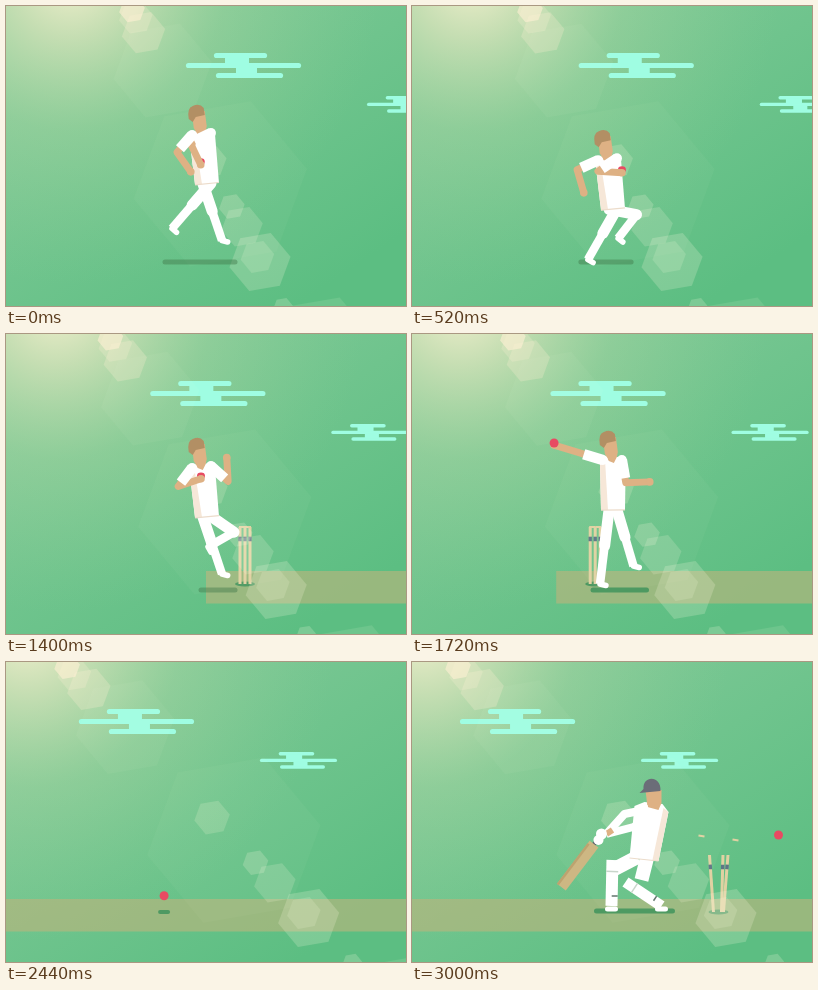
Animation, 400 px wide and 300 px high, one loop 3.04 s. Source, as an HTML page with a canvas:

```html
<!DOCTYPE html>
<html lang="en">
<head>
<meta charset="utf-8">
<title>Cricket</title>
<style>
html, body { margin: 0; width: 100%; height: 100%; overflow: hidden; background: #6cc48c; }
canvas { display: block; width: 400px; height: 300px; }
</style>
</head>
<body>
<canvas id="stage" width="400" height="300"></canvas>
<script>
const c = document.getElementById('stage').getContext('2d');
const LOOP = 3040, STEP = 40, STRIDE = 640;
const GATHER = 1400, LAND = 1640, RELEASE = 2040, BOUNCE = 2480, HIT = 2760, END = 3000;
const SKIN = '#deb184', WHITE = '#fff', SHADE = '#f6e7d8', RED = '#e84a62', WOOD = '#e0d1a2';
const SHADOW = 'rgba(45,140,85,.7)', SOFT = 'rgba(65,120,75,.45)';

const { sin, cos, min, max, hypot, PI } = Math;
const lerp = (a, b, p) => a + (b - a) * p;
const mix = (a, b, p) => a.map((v, i) => lerp(v, b[i], p));
const add = (a, b) => [a[0] + b[0], a[1] + b[1]];
const polar = (angle, r) => [r * cos(angle), r * sin(angle)];
const part = (t, a, b) => min(1, max(0, (t - a) / (b - a)));
const ease = p => p * p * (3 - 2 * p);

function line(points, width, color, cap = 'butt') {
  c.beginPath();
  points.forEach(p => c.lineTo(...p));
  c.lineWidth = width;
  c.lineCap = cap;
  c.lineJoin = 'round';
  c.strokeStyle = color;
  c.stroke();
}
function poly(points, color) {
  c.beginPath();
  points.forEach(p => c.lineTo(...p));
  c.closePath();
  c.fillStyle = color;
  c.fill();
}
function dot(x, y, r, color, ry = r) {
  c.beginPath();
  c.ellipse(x, y, r, ry, 0, 0, 7);
  c.fillStyle = color;
  c.fill();
}

// Camera travel: time, distance, speed
const track = [[0, 0, .245], [GATHER, 343, .245], [RELEASE, 425, .06], [2440, 1030, .85], [LOOP, 1274, .1]];
function camera(t) {
  const i = max(1, track.findIndex(k => k[0] >= t));
  const [t0, x0, v0] = track[i - 1], [t1, x1, v1] = track[i];
  const d = t1 - t0, p = (t - t0) / d, q = 1 - p;
  return lerp(x0, x1, ease(p)) + d * p * q * (v0 * q - v1 * p);
}

function backdrop(u) {
  let g = c.createLinearGradient(90, 0, 290, 300);
  g.addColorStop(0, '#84c999');
  g.addColorStop(.5, '#6fc48d');
  g.addColorStop(1, '#5cbe82');
  c.fillStyle = g;
  c.fillRect(0, 0, 400, 300);
  const x = lerp(65, 10, u);
  g = c.createRadialGradient(x, -30, 0, x, -30, 310);
  g.addColorStop(0, 'rgba(250,242,210,.95)');
  g.addColorStop(.2, 'rgba(232,233,192,.65)');
  g.addColorStop(.5, 'rgba(185,220,165,.3)');
  g.addColorStop(1, 'rgba(150,210,150,0)');
  c.fillStyle = g;
  c.fillRect(0, 0, 400, 300);
}

function cloud(x, y, s) {
  c.save();
  c.translate(x, y);
  c.scale(s, s);
  const color = '#9ffde2';
  [[28, 81], [0, 115], [30, 97]].forEach(([a, b], i) =>
    line([[a + 2.5, 2.5 + 10 * i], [b - 2.5, 2.5 + 10 * i]], 5.2, color, 'round'));
  c.fillStyle = color;
  c.fillRect(39, 3, 24, 9);
  c.fillRect(50, 13, 21, 9);
  c.restore();
}

// Flares sit on the ray from the light to a pivot: place on the ray, radius, opacity
function flare(u) {
  const light = [126 - 80 * u, 4 + u], pivot = [254 + 60 * u, 256];
  [[0, 13, .6], [.03, 17, .22], [.09, 22, .25], [.24, 50, .04], [.6, 18, .17], [.69, 88, .03],
   [.78, 13, .2], [.86, 21, .17], [.98, 17, .15], [1, 31, .2], [1.18, 10, .2], [1.42, 75, .1]
  ].forEach(([k, r, a]) => {
    const center = mix(light, pivot, k);
    poly([0, 1, 2, 3, 4, 5].map(i => add(center, polar(i * PI / 3 - .17, r))),
      `rgba(255,${k < .1 ? '240,212' : '250,225'},${a})`);
  });
}

function wicket(x, p = 0) {
  dot(x, 250, 10, SHADOW, 2.4);
  [-1, 0, 1].forEach(i => {
    const foot = [x + 5 * i + (i ? 0 : 3 * p), 250], top = [x + 5 * i + (i < 0 ? -4 : 4.5) * p, 193];
    line([foot, top], 3, WOOD);
    line([mix(top, foot, .17), mix(top, foot, .25)], 3.4, '#5d7685');
  });
  const fly = Math.sqrt(p);
  [-1, 1].forEach(i => {
    const bx = x + i * lerp(3, 17, fly), by = lerp(193, 176 + 2 * i, fly);
    line([[bx - 3, by - .6 * p], [bx + 3, by + .6 * p]], 2, WOOD);
  });
}

// Middle joint of a limb from a to b; bend 1 points backwards, -1 forwards
function joint(a, b, upper, lower, bend) {
  const dx = b[0] - a[0], dy = b[1] - a[1], d = max(1, hypot(dx, dy));
  const reach = d > upper + lower ? d * upper / (upper + lower) : (upper ** 2 - lower ** 2 + d * d) / (2 * d);
  const h = bend * Math.sqrt(max(0, upper ** 2 - reach ** 2));
  return [a[0] + (dx * reach - dy * h) / d, a[1] + (dy * reach + dx * h) / d];
}
function arm(shoulder, hand) {
  const elbow = joint(shoulder, hand, 23, 24, 1);
  line([shoulder, elbow, hand], 7, SKIN);
  dot(...hand, 3.8, SKIN);
  line([shoulder, mix(shoulder, elbow, .8)], 10.5, WHITE);
  dot(...shoulder, 5, WHITE);
}
function leg(hip, foot) {
  const knee = joint(hip, foot, 28, 30, -1);
  const dx = foot[0] - knee[0], dy = foot[1] - knee[1], d = hypot(dx, dy);
  line([hip, knee], 11, WHITE, 'round');
  line([knee, foot], 8.5, WHITE);
  line([foot, add(foot, [6 * dy / d, max(1.5, -6 * dx / d)])], 5.5, WHITE, 'round');
}
function head(at, turn) {
  c.save();
  c.translate(...at);
  c.rotate(turn);
  poly([[-5, -2], [8, -2], [10, 13], [9, 18], [6, 24], [1, 22], [-3, 15]], SKIN);
  c.beginPath();
  c.moveTo(-8, 6);
  c.quadraticCurveTo(-10, -5, -4, -7);
  c.quadraticCurveTo(3, -10, 7, -5);
  c.lineTo(8, 2);
  c.lineTo(-1, 4);
  c.lineTo(-4, 9);
  c.closePath();
  c.fillStyle = '#b28f64';
  c.fill();
  c.restore();
}

// Running: each foot follows a tilted loop while the body bounces once per step
const bounce = t => 1 - (2 * ((t / STRIDE * 2 + .375) % 1) - 1) ** 2;
function runFoot(t, offset) {
  const a = 2 * PI * (t / STRIDE + offset);
  return [191 + 25 * cos(a) - 6 * sin(a), 243 + 6 * cos(a) + 14 * sin(a) - 15.5 * bounce(t)];
}

function bowler(t, cam) {
  const off = t > RELEASE ? cam - 425 : 0;
  if (off > 320) return;
  const gather = ease(part(t, 1220, GATHER)), bowl = ease(part(t, GATHER, RELEASE));
  const lean = lerp(-.1, .83, ease(part(t, LAND, RELEASE)));
  const hip = [201, 203 - 27 * bounce(min(t, LAND))];
  const chest = add(hip, polar(lean - PI / 2, 53));
  const side = (p, w) => add(p, polar(lean + PI, w));

  const lift = 8 * sin(PI * bowl);
  const feet = [
    mix(runFoot(t, 0), add(mix([216, 240], [160, 244], bowl), [0, lift]), gather),
    mix(runFoot(t, .5), mix([202, 213], [241, 251], bowl), gather)
  ];
  // The bowling arm turns a full circle; the other one drops
  const swing = cos(2 * PI * (t / STRIDE - .12));
  const turn = lerp(.88, 6, bowl) + 1.4 * part(t, RELEASE, 2240);
  const backHand = mix([-10 + 12 * swing, 34 + 4 * swing], polar(turn, lerp(14, 51, part(t, GATHER, LAND))), gather);
  const frontHand = mix([-14 * swing, 20 + 16 * swing], polar(lerp(-.5, 1.83, bowl), lerp(18, 53, bowl)), gather);
  const shoulders = [side(chest, 10), side(chest, -9)].map(p => add(p, polar(lean + PI / 2, 3)));
  const hands = [add(shoulders[0], backHand), add(shoulders[1], frontHand)];
  const [bx, by] = hands[t < 1240 ? 1 : 0];

  c.save();
  c.translate(-off, 0);
  const xs = feet.map(f => f[0]);
  line([[min(...xs) - 7, 256], [max(...xs) + 13, 256]], 5, t < LAND ? SOFT : SHADOW, 'round');
  leg(side(hip, -4), feet[1]);
  leg(side(hip, 4), feet[0]);
  poly([side(chest, 13), side(chest, -13), side(hip, -12), side(hip, 12)], WHITE);
  poly([side(chest, 13), side(chest, 8), side(hip, 5), side(hip, 12)], SHADE);
  line([side(hip, 12), side(hip, -12)], 1.2, '#ecdccb');
  const nod = max(0, lean) * 1.9;
  head(add(chest, polar(nod - 1.84, 18.7)), nod);
  if (t < LAND) dot(bx, by - 3, 4, RED, 3.4);
  arm(shoulders[1], hands[1]);
  arm(shoulders[0], hands[0]);
  if (t >= LAND && t < RELEASE) dot(bx, by - 2, 4.5, RED);
  c.restore();
}

function pad(knee, ankle, width) {
  line([knee, ankle], width, WHITE);
  const dx = (ankle[0] - knee[0]) / width, dy = (ankle[1] - knee[1]) / width;
  const size = hypot(dx, dy), nx = -dy / size * width / 2, ny = dx / size * width / 2;
  [[.25, 1, '#c9d6cb'], [.78, 0, '#62756d']].forEach(([p, full, color]) => {
    const m = mix(knee, ankle, p);
    line([[m[0] + nx * full, m[1] + ny * full], [m[0] - nx, m[1] - ny]], 1.5, color);
  });
  line([add(ankle, [-4, 3]), add(ankle, [4, 3])], 5, WHITE, 'round');
}

function batter(t, x) {
  if (x > 260) return;
  const s = ease(part(t, 2560, 2880)), q = 1 - s;
  c.save();
  c.translate(x, 0);
  line([[184, 249], [260, 249]], 5, SHADOW, 'round');
  line([[235, 194], [229, 218]], 14, WHITE);
  pad([213, 220], [249, 244], 11);
  line([[225, 195], [202 + 12 * q, 207]], 14, WHITE);
  pad([200 + 12 * q, 198], [199 + 12 * q, 244], 12);

  c.translate(4 * q, 0);
  poly([[222, 144], [232, 140], [250, 142], [256, 150], [246, 199], [217, 196]], WHITE);
  poly([[251, 146], [256, 150], [246, 199], [240, 198]], SHADE);
  line([[217, 196], [246, 199]], 1.2, '#ecdccb');
  poly([[233, 128], [249, 128], [249, 141], [246, 148], [235, 145]], SKIN);
  c.beginPath();
  c.moveTo(227, 131);
  c.lineTo(231, 127);
  c.bezierCurveTo(230, 113, 249, 113, 248, 129);
  c.closePath();
  c.fillStyle = '#6b6d78';
  c.fill();

  // bat, arms and gloves follow the hands
  const hands = [187 + 18 * q, 175 + 6 * q];
  c.save();
  c.translate(...hands);
  c.rotate(lerp(.35, 2.22, s));
  line([[-8, 0], [10, 0]], 4, '#5f646c');
  line([[9, 0], [63, 0]], 11, '#cdb783');
  line([[12, 4.5], [63, 4.5]], 2.5, '#bda36f');
  c.restore();
  const wrist = add(hands, [7, -3]);
  line([[236, 147], [212 + 5 * q, 152], wrist], 8, WHITE);
  line([[242, 154], [221 + 3 * q, 165], wrist], 8, WHITE);
  line([add(wrist, [6, -4]), wrist], 6, SKIN);
  dot(hands[0] + 2, hands[1] - 3, 5.5, WHITE);
  dot(hands[0] - 1, hands[1] + 3, 5, WHITE);
  c.restore();
}

function ball(t, cam) {
  if (t < RELEASE) return;
  const drop = part(t, RELEASE, BOUNCE), rise = part(t, BOUNCE, HIT), off = part(t, HIT, END);
  const x = 709 + 527 * drop + 336 * rise + 64 * off - cam;
  const y = 141 + 104 * drop ** 1.2 - 37 * rise * (1.6 - .6 * rise) - 35 * off;
  if (t > RELEASE + 120 && t < HIT) line([[x - 4, 250], [x + 4, 250]], 4, SHADOW, 'round');
  dot(x, y, 4.5, RED);
}

function draw() {
  const t = Math.floor(performance.now() % LOOP / STEP) * STEP;
  const cam = camera(t), u = cam / 1270;
  backdrop(u);
  cloud(180 - 132 * u, 47, 1);
  cloud(361 - 132 * u, 90, .67);
  const left = max(0, 543 - cam);
  c.fillStyle = 'rgba(185,182,125,.65)';
  c.fillRect(left, 237, 400 - left, 32.5);
  wicket(582 - cam);
  wicket(1576 - cam, part(t, HIT, END));
  flare(u);
  batter(t, 1270 - cam);
  bowler(t, cam);
  ball(t, cam);
  requestAnimationFrame(draw);
}
draw();
</script>
</body>
</html>
```
